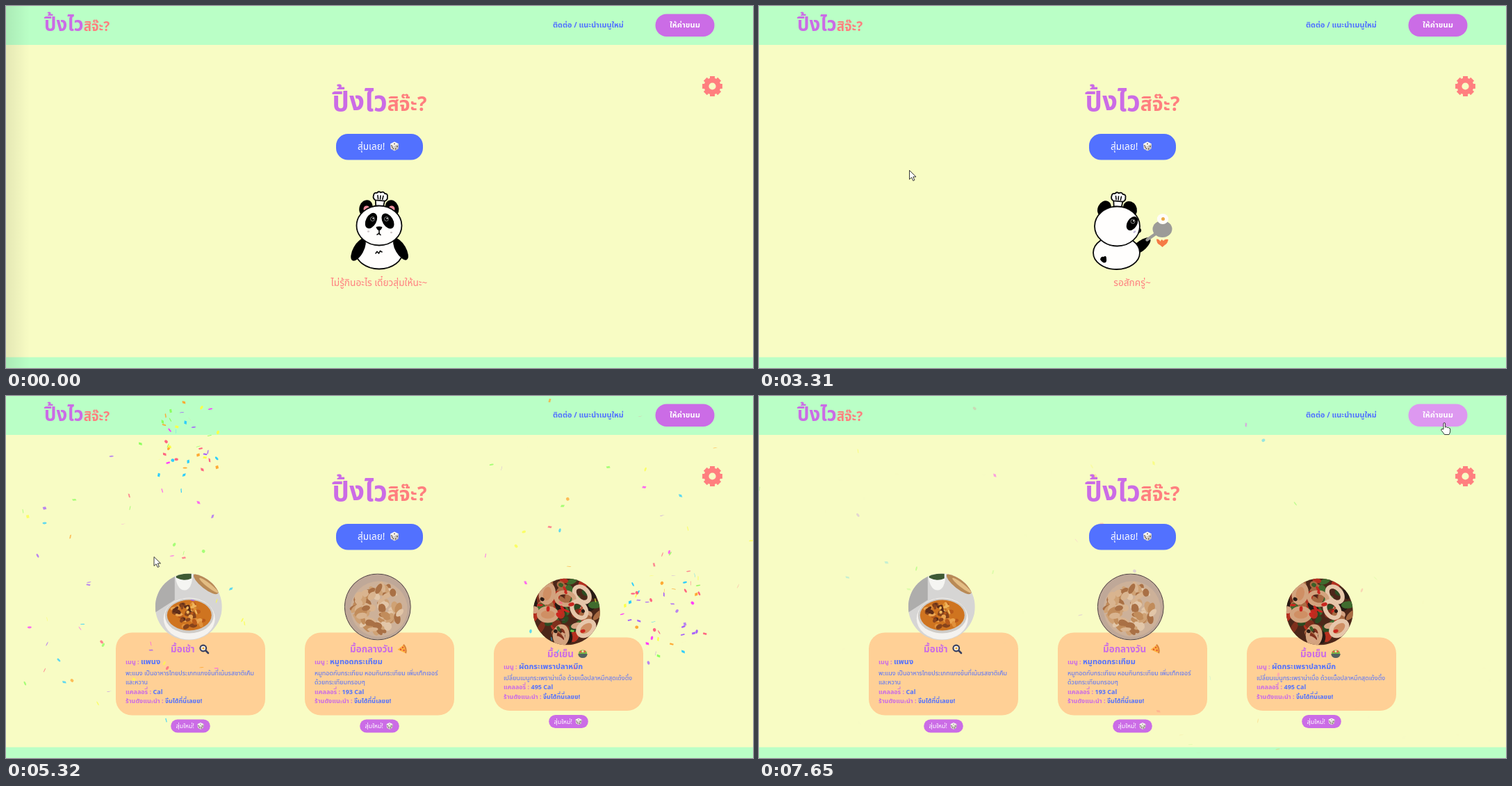
Write an HTML page with a canvas that moves like this. It is 1075 px wide and 521 px high and loops after 7990 ms.

```html
<!DOCTYPE html>
<html lang="th">
<head>
<meta charset="utf-8">
<title>ปิ้งไวสิจ๊ะ?</title>
<style>
  html, body { margin: 0; width: 100%; height: 100%; overflow: hidden; background: #f8fcc4; }
  svg, canvas { position: absolute; left: 0; top: 0; width: 1075px; height: 521px; }
  text { font: 9px "Noto Sans Thai", "Noto Sans", sans-serif; white-space: pre; }
  .b { font-weight: 700; }
  .s { font-weight: 600; }
  .mid { text-anchor: middle; }
  .purple { fill: #cb6ce6; }
  .coral { fill: #ff7f7f; }
  .blue { fill: #5271ff; }
  .white { fill: #fff; }
  .ink { fill: #fffefd; stroke: #0b0b0b; stroke-width: 1.8; }
  .line { fill: none; stroke: #0b0b0b; stroke-width: 1.6; stroke-linecap: round; }
</style>
</head>
<body>
<svg viewBox="0 0 1075 521">
  <defs>
    <linearGradient id="shade"><stop stop-opacity=".08"/><stop offset="1" stop-opacity="0"/></linearGradient>
    <clipPath id="plate"><circle r="48"/></clipPath>
    <g id="dice">
      <path d="M0-6.5 6-3.6 5.3 3.4 0 6.5-5.3 3.4-6-3.6Z" fill="#e3e1dc"/>
      <path d="M0-6.5 6-3.6 0-.8-6-3.6Z" fill="#faf8f4"/>
      <path d="M0-.8V6.5L5.3 3.4 6-3.6Z" fill="#c9c5be"/>
      <path d="M-4-1v.1M-1.7 3.2v.1M-3 1.1v.1M1.6 3.5v.1M4 .1v.1M0-3.7v.1" stroke="#5c4640" stroke-width="1.7" stroke-linecap="round"/>
    </g>
    <g id="pan">
      <path d="M2 2 6 6" stroke="#39405f" stroke-width="2.6" stroke-linecap="round"/>
      <circle cx="-1.2" cy="-1" r="5.4" fill="#39405f"/>
      <circle cx="-1.2" cy="-1" r="3.3" fill="#f6f1ea"/><circle cx="-1" cy="-1" r="1.6" fill="#f5a623"/>
    </g>
    <g id="pizza">
      <path d="M-6.5 1 2.5-6Q6-1 5 6Z" fill="#ffb23e"/>
      <path d="M2-6.2Q7-1 5.2 6.2" fill="none" stroke="#d9803a" stroke-width="2"/>
      <path d="M1-2v.1M-2 .8v.1M2.6 2v.1" stroke="#e2553b" stroke-width="2.4" stroke-linecap="round"/>
    </g>
    <g id="salad">
      <ellipse cy="-1" rx="6" ry="4.6" fill="#75b843"/>
      <path d="M-3-3v.1M2.4-3.4v.1" stroke="#ea5a47" stroke-width="3" stroke-linecap="round"/>
      <circle cy="-3.4" r="1.5" fill="#f5e6b0"/>
      <path d="M-6.8 0H6.8Q6 6 0 6T-6.8 0Z" fill="#52615f"/>
    </g>
    <g id="hat">
      <path class="ink" d="M-7 10-5.5 21H5.5L7 10Z"/>
      <path class="ink" d="M-7 13Q-11 11-10 6.5-10 2-5.5 2.5-3-1 0 1.5 4-1 6 2.5 10.5 2 10 7 11 11 7 13Z"/>
      <path class="line" d="M-4 6-3 11M0 6V11M4 6 3.3 11"/>
    </g>
    <g id="eye"><circle r="3" fill="none" stroke="#bbb" stroke-width=".7"/><circle cx="1" cy="-.8" r="1" fill="#fff"/></g>
  </defs>

  <rect width="1075" height="56" fill="#baffc6"/>
  <rect y="505.5" width="1075" height="16" fill="#baffc6"/>
  <text class="b purple" x="55" y="36" style="font-size:27.5px">ปิ้งไว<tspan class="coral" style="font-size:18.8px">สิจ๊ะ?</tspan></text>
  <text class="b blue" x="787" y="31" style="font-size:10.8px">ติดต่อ / แนะนำเมนูใหม่</text>
  <rect id="tip" x="934.5" y="11.5" width="85" height="32.5" rx="16.2" fill="#cb6ce6"/>
  <text class="b white mid" x="977" y="31" style="font-size:11.2px">ให้ค่าขนม</text>
  <g transform="translate(1016.5 115.5)" fill="none" stroke="#ff7f7f">
    <circle r="8.5" stroke-width="6.8"/>
    <path id="teeth" stroke-width="7"/>
  </g>
  <text class="b purple mid" x="537.5" y="151" style="font-size:38.4px">ปิ้งไว<tspan class="coral" style="font-size:28.4px">สิจ๊ะ?</tspan></text>
  <rect id="go" x="475" y="184" width="125" height="37.5" rx="17"/>
  <text class="white" x="506" y="207" style="font-size:13.6px">สุ่มเลย!</text>
  <use href="#dice" x="559" y="202"/>

  <g id="idle">
    <ellipse cx="518" cy="291" rx="9.5" ry="12" transform="rotate(18 518 291)"/>
    <ellipse cx="555.5" cy="291" rx="9.5" ry="12" transform="rotate(-22 555.5 291)"/>
    <circle cx="519" cy="292" r="4.5" fill="#ef8d9c"/><circle cx="555" cy="292" r="4.5" fill="#ef8d9c"/>
    <use href="#hat" transform="translate(539.5 267) rotate(5)"/>
    <ellipse class="ink" cx="537" cy="353" rx="34" ry="25.5"/>
    <ellipse cx="507" cy="351" rx="7.5" ry="17.5" transform="rotate(29 507 351)"/>
    <ellipse cx="568" cy="350" rx="7.5" ry="17.5" transform="rotate(-30 568 350)"/>
    <ellipse class="ink" cx="537" cy="316" rx="32.5" ry="28.5"/>
    <ellipse cx="525.5" cy="309" rx="7.5" ry="12" transform="rotate(28 525.5 309)"/>
    <ellipse cx="549.5" cy="309.5" rx="7.5" ry="12" transform="rotate(-32 549.5 309.5)"/>
    <use href="#eye" x="527.5" y="306.5"/><use href="#eye" x="547.5" y="306.5"/>
    <path d="M532.5 318Q537 316.5 541.5 318 540 323 537 323T532.5 318Z"/>
    <path class="line" d="M537 322V327M534 329Q536.5 328 537 326.5 537.5 329 539 329.5M532 356 534 353.5 536.5 356 538.5 352.5 541 354"/>
    <ellipse cx="521.5" cy="324.5" rx="1.6" ry="1.3" fill="#cfc5c7"/><ellipse cx="554.5" cy="326" rx="1.6" ry="1.3" fill="#cfc5c7"/>
    <g class="b" id="ask" fill="#111"></g>
    <text class="coral mid" x="537" y="403" style="font-size:13.7px">ไม่รู้กินอะไร เดี๋ยวสุ่มให้นะ~</text>
  </g>

  <g id="cook">
    <g id="chef">
      <ellipse cx="501" cy="292" rx="9.5" ry="12" transform="rotate(25 501 292)"/>
      <ellipse cx="538" cy="292" rx="9.5" ry="11.5" transform="rotate(-30 538 292)"/>
      <use href="#hat" transform="translate(522 268) rotate(5)"/>
      <path d="M546 342Q557 333 566 333 570 337 564 345T550 356Z"/>
      <ellipse class="ink" cx="518.5" cy="355" rx="33.5" ry="24"/>
      <path d="M495 365Q496 360 500 361 504 358 504 364 505 370 500 369.5 497 368 495 365Z"/>
      <path d="M549 319.5Q555 319 554 324 553 327 549 327Z"/>
      <ellipse class="ink" cx="519.5" cy="317" rx="32.5" ry="28.5"/>
      <ellipse cx="541" cy="313" rx="7" ry="11" transform="rotate(32 541 313)"/>
      <use href="#eye" x="542" y="310"/>
      <ellipse cx="544.5" cy="325" rx="2.2" ry="1.3" fill="#c2b8dd" transform="rotate(-40 544.5 325)"/>
    </g>
    <path d="M558.5 336.5 572 327" stroke="#9c9b98" stroke-width="4.5" stroke-linecap="round"/>
    <ellipse cx="580.5" cy="321" rx="14" ry="12" fill="#9c9b98"/>
    <g id="egg"><ellipse cx="581" cy="320.5" rx="8.2" ry="7.5" fill="#fffdf8"/><circle cx="581.5" cy="320.5" r="2.5" fill="#ecaa46"/></g>
    <path d="M572 335.5Q576 335 577.5 339 579 334 582 338 584 335 589 336 588 342 584 344L580.5 347 577 344Q572 342 572 335.5Z" fill="#f57a45"/>
    <text class="coral mid" x="537" y="403" style="font-size:13.7px">รอสักครู่~</text>
  </g>

  <g id="cards"></g>
  <rect id="edge" width="34" height="521" fill="url(#shade)"/>
</svg>
<canvas width="1075" height="521"></canvas>

<script>
const $ = id => document.getElementById(id);
const LOOP = 7990;
const TIMES = [0, 330, 650, 980, 1310, 1640, 1950, 2330, 2640, 2970, 3310, 3640,
  3960, 4300, 4630, 4970, 5320, 5660, 5990, 6330, 6670, 6990, 7320, 7650];

let seed = 7;
function rnd(a = 1, b = 0) {
  seed = seed + 0x6D2B79F5 | 0;
  let t = Math.imul(seed ^ seed >>> 15, 1 | seed);
  t = t + Math.imul(t ^ t >>> 7, 61 | t) ^ t;
  return b + (a - b) * ((t ^ t >>> 14) >>> 0) / 4294967296;
}
const many = (n, f) => Array.from({ length: n }, (_, i) => f(i)).join('');
const ell = (x, y, rx, ry, fill, turn = 0, more = '') =>
  `<ellipse rx="${rx}" ry="${ry}" fill="${fill}" transform="translate(${x} ${y}) rotate(${turn})" ${more}/>`;
const pick = a => a[Math.floor(rnd(a.length))];
// random blobs inside a disc
const blobs = (n, R, size, cols, cx = 0, cy = 0, flat = 1) => many(n, () => {
  const a = rnd(6.283), d = R * Math.sqrt(rnd());
  return ell(cx + d * Math.cos(a), cy + d * Math.sin(a) * flat, rnd(size, size * .5), rnd(size * .6, size * .3), pick(cols), rnd(180));
});

$('teeth').setAttribute('d', many(8, i => {
  const c = Math.cos(i * Math.PI / 4), s = Math.sin(i * Math.PI / 4);
  return `M${c * 9} ${s * 9}L${c * 14.4} ${s * 14.4}`;
}));

const backdrop = fill => `<rect x="-48" y="-48" width="96" height="96" fill="${fill}"/>`;
const FOOD = [
  backdrop('#d6d5d4') +
    '<path d="M-48-48H-20V-10L-48 8Z" fill="#aeadac"/>' +
    '<path d="M-20-48H6Q5-24-6-24T-20-48Z" fill="#f5f5f2"/><path d="M-18-48H4V-41Q-6-36-18-42Z" fill="#3e5a34"/>' +
    ell(25, -33, 22, 7, '#b98a56', 38) + ell(29, -31, 17, 3, '#e3bd84', 38) +
    ell(1, 17, 37, 30, '#f4f2ef') + ell(1, 13, 35, 25, '#cfccc8') + ell(1, 12, 32, 22, '#cf7420') +
    blobs(26, 26, 6, ['#e0903a', '#b95a1a', '#86431b', '#eba550'], 1, 12, .65) +
    blobs(14, 13, 5, ['#5e2d18', '#8c451d'], -8, 10) + blobs(14, 9, 4, ['#f0b75c', '#e0912f', '#c9752a'], 5, 5),
  backdrop('#bfa898') + ell(2, 3, 41, 40, '#cdb199') +
    blobs(90, 33, 9, ['#d9b48f', '#c18c5b', '#e2c6a8', '#cfa275', '#a97045'], 0, 2) +
    '<circle r="47.5" fill="none" stroke="#4c4342"/>',
  backdrop('#4c2719') +
    blobs(70, 47, 11, ['#2c4a22', '#3f6b2e', '#7e2f1c', '#b5301f', '#271a14', '#a86a42', '#d5a382']) +
    [[-27, 4], [22, -25], [-8, 34], [28, 24], [-2, -19], [18, -3], [-28, -26]].map(([x, y], i) =>
      ell(x, y, 13, 9, i % 3 ? 'none' : '#cf8f64', i * 47, `stroke="${i % 2 ? '#e6c6aa' : '#d3a37e'}" stroke-width="6"`)).join('') +
    blobs(16, 42, 5, ['#c9271f', '#3c5f28', '#2a1b15'])
];

const MEALS = [
  [158, 340.5, 'มื้อเช้า', 237, 'pan', 285, 'แพนง', ['พะแนง เป็นอาหารไทยประเภทแกงข้นที่เน้นรสชาติเค็ม', 'และหวาน'], 'Cal'],
  [430, 340.5, 'มื้อกลางวัน', 495, 'pizza', 570, 'หมูทอดกระเทียม', ['หมูทอดกับกระเทียม หอมกินกระเทียม เพิ่มเท็กเจอร์', 'ด้วยกระเทียมกรอบๆ'], '193 Cal'],
  [702, 347.5, 'มื้อเย็น', 779, 'salad', 830, 'ผัดกระเพราปลาหมึก', ['เปลี่ยนเมนูกระเพราน่าเบื่อ ด้วยเนื้อปลาหมึกสุดเด้งดึ๋ง'], '495 Cal']
];
const pair = (x, y, label, value, size = 9) =>
  `<text class="s purple" x="${x}" y="${y}">${label} : <tspan class="b blue" style="font-size:${size}px">${value}</tspan></text>`;

$('cards').innerHTML = MEALS.map(([x, y, name, nx, icon, ix, dish, about, cal], i) => {
  const left = x + 14, h = 92 + 13.5 * about.length, end = y + 61 + 13.5 * about.length;
  return `<rect x="${x}" y="${y}" width="215" height="${h}" rx="23" fill="#ffd096"/>
    <g transform="translate(${x + 104.8} ${y - 37})"><circle class="disc" r="48.2" fill="#cb6ce6"/>
      <g class="food" clip-path="url(#plate)">${FOOD[i]}</g></g>
    <text class="b purple" x="${nx}" y="${y + 28}" style="font-size:13.44px">${name}</text>
    <use href="#${icon}" x="${ix}" y="${y + 23.5}"/>
    ${pair(left, y + 45.5, 'เมนู', dish, 11)}
    ${about.map((s, k) => `<text class="blue" x="${left}" y="${y + 61 + 13.5 * k}">${s}</text>`).join('')}
    ${pair(left, end, 'แคลลอรี่', cal)}${pair(left, end + 13.5, 'ร้านดังแนะนำ', 'จิ้มได้ที่นี่เลยย!')}
    <rect class="purple" x="${x + 79.2}" y="${y + h + 6}" width="56.6" height="19" rx="9.5"/>
    <text class="white" x="${x + 86.5}" y="${y + h + 18.5}">สุ่มใหม่!</text>
    <use href="#dice" transform="translate(${x + 122} ${y + h + 15.5}) scale(.74)"/>`;
}).join('');

// Confetti: paired bursts, each smaller than the last
const SCALE = .56, TICK = 21, LIFE = 60;
const COLORS = ['#26ccff', '#a25afd', '#ff5e7e', '#88ff5a', '#fcff42', '#ffa62d', '#ff36ff'];
const FIRST = [[[190, 260], [870, 165]], [[256, 65], [952, 305]]];
const bits = [];
for (let k = 0; k < 8; k++) for (const side of [0, 1]) {
  const [x, y] = FIRST[k]?.[side] ?? [1075 * (rnd(.3, .1) + side * .6), 521 * rnd(.8, -.2)];
  const n = Math.round(48 * (1 - k / 8));
  for (let i = 0; i < n; i++) bits.push({
    x, y, born: 4975 + 285 * k, angle: rnd(6.283), speed: rnd(45, 15), wob: rnd(10), rate: rnd(.11, .05),
    tilt: rnd(2.36, .79), thick: rnd(3, 2), color: pick(COLORS), round: rnd() < .5
  });
}

const g = document.querySelector('canvas').getContext('2d');
function confetti(now) {
  for (const b of bits) {
    const t = (now - b.born) / TICK;
    if (t < 0 || t > LIFE) continue;
    const d = b.speed * (1 - .9 ** t) * 10, w = b.wob + b.rate * t, tilt = b.tilt + .1 * t;
    const wx = 10 * Math.cos(w), wy = 10 * Math.sin(w);
    const tx = b.thick * Math.cos(tilt), ty = b.thick * Math.sin(tilt);
    g.save();
    g.translate(b.x + SCALE * d * Math.cos(b.angle), b.y + SCALE * (d * Math.sin(b.angle) + 3 * t));
    g.scale(SCALE, SCALE);
    g.globalAlpha = 1 - t / LIFE;
    g.fillStyle = b.color;
    g.beginPath();
    if (b.round) g.ellipse(0, 0, Math.abs(wx) * .6, Math.abs(wy) * .6, Math.PI / 10 * w, 0, 7);
    else { g.moveTo(0, 0); g.lineTo(wx, ty); g.lineTo(wx + tx, wy + ty); g.lineTo(tx, wy); }
    g.fill();
    g.restore();
  }
}

const ARROW = new Path2D('M.5.5V13.5L3.6 10.7 5.8 15.5 7.9 14.5 5.8 9.9H10Z');
const HAND = new Path2D('M4 10V2Q4 .5 5.3 .5T6.6 2V7Q9 6 9.5 7.5 11.5 6.8 12 8.3 13.7 8 13.7 10V13Q13.5 15 12 17.5H5.5Q4 15 1 11.5 .3 9.5 2 9.3Z');
const POINTER = [[558, 208], [560, 213], [330, 215], [219, 227], [219, 233], [218, 236], [216, 236], [214, 236],
  [214, 235], [214, 235], [213, 231], [213, 231], [212.5, 231], [213, 231], [430, 200], [800, 140],
  [1002, 102], [1000, 92], [982, 38], [981, 38]];
function pointer(step) {
  if (step < 4) return;
  const [x, y] = POINTER[step - 4], shape = step < 6 || step > 21 ? HAND : ARROW;
  g.save();
  g.translate(x, y);
  g.fillStyle = '#fff';
  g.strokeStyle = '#222';
  g.lineWidth = .9;
  g.fill(shape);
  g.stroke(shape);
  g.restore();
}

const ASK = ['', [575, 271, 19], [589, 269, 19], [589, 268, 22]];
const show = (el, on) => el.style.display = on ? '' : 'none';
let last = -1;
function draw(now) {
  const t = now % LOOP, step = TIMES.findLastIndex(s => s <= t);
  if (step !== last) {
    last = step;
    show($('idle'), step < 7);
    show($('cook'), step >= 7 && step < 14);
    show($('cards'), step >= 14);
    show($('edge'), step < 6);
    document.querySelectorAll('.food').forEach(f => show(f, step >= 15));
    document.querySelectorAll('.disc').forEach(f => show(f, step < 15));
    const q = ASK[step];
    $('ask').innerHTML = q ? `<text x="${q[0]}" y="${q[1]}" style="font-size:${q[2]}px">?</text>` : '';
    const toss = step >= 10 && step < 13;
    $('chef').setAttribute('transform', toss ? 'translate(-4 0)' : '');
    $('egg').setAttribute('transform', toss ? 'translate(0 -14)' : '');
    $('go').setAttribute('fill', step === 4 || step === 5 ? '#7f96ff' : step === 6 ? '#6882ff' : '#5271ff');
    $('tip').setAttribute('fill', step > 21 ? '#dd98f0' : '#cb6ce6');
    g.clearRect(0, 0, 1075, 521);
    confetti(TIMES[step]);
    pointer(step);
  }
  requestAnimationFrame(() => draw(performance.now() - start));
}
const start = performance.now();
draw(0);
</script>
</body>
</html>
```
